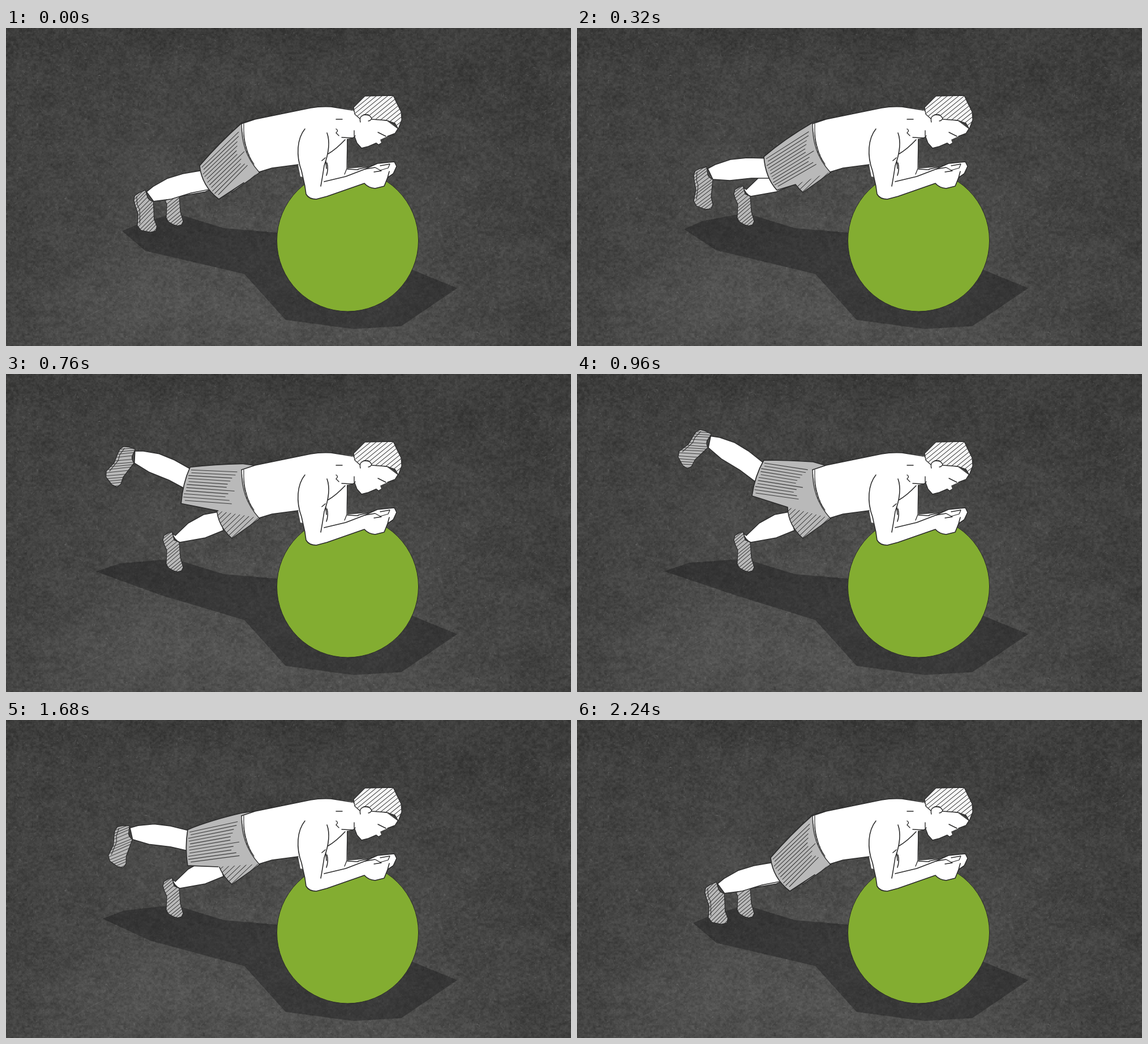
These frames come from a looping animation (998 px wide and 561 px high, 3000 ms). An HTML page with a canvas:

```html
<!DOCTYPE html>
<html lang="en">
<head>
<meta charset="utf-8">
<title>Leg raise on a ball</title>
<style>
html, body { margin: 0; width: 100%; height: 100%; overflow: hidden; background: #444; }
canvas { display: block; width: 100vw; height: 100vh; }
</style>
</head>
<body>
<canvas id="stage" width="998" height="561"></canvas>
<script>
const W = 998, H = 561, LOOP = 3000, STEP = 40, SWING = 960;
const INK = '#2b2b2b', CLOTH = '#b9b9b9', SKIN = '#fff';
const ctx = document.getElementById('stage').getContext('2d');

// ---- floor texture ----
let seed = 7;
const rand = () => {
  seed = (seed * 1664525 + 1013904223) >>> 0;
  return seed / 4294967296;
};

function hash(x, y) {
  let h = Math.imul(x, 374761393) + Math.imul(y, 668265263);
  h = Math.imul(h ^ (h >>> 13), 1274126177);
  return ((h ^ (h >>> 16)) >>> 0) / 4294967296;
}

function noise(x, y) {
  const i = Math.floor(x), j = Math.floor(y);
  const s = v => v * v * (3 - 2 * v), u = s(x - i), v = s(y - j);
  const top = hash(i, j) * (1 - u) + hash(i + 1, j) * u;
  const low = hash(i, j + 1) * (1 - u) + hash(i + 1, j + 1) * u;
  return top * (1 - v) + low * v - 0.5;
}

function makeFloor() {
  const c = document.createElement('canvas');
  c.width = W; c.height = H;
  const g = c.getContext('2d'), img = g.createImageData(W, H);
  for (let y = 0, k = 0; y < H; y++) {
    for (let x = 0; x < W; x++, k += 4) {
      const d = Math.hypot((x - 440) / 480, (y - 455) / 300);
      let v = 61 + 24 * Math.exp(-d * d * 1.3);
      v += noise(x / 130, y / 80) * 8 + noise(x / 34 + 90, y / 30) * 7;
      v += noise(x / 5, y / 4 + 50) * 15 + noise(x / 2.2, y / 2.2 + 300) * 12;
      v = Math.round(v / 5) * 5;
      img.data[k] = img.data[k + 1] = v;
      img.data[k + 2] = v - 1;
      img.data[k + 3] = 255;
    }
  }
  g.putImageData(img, 0, 0);
  for (let i = 0; i < 2600; i++) {
    const x = rand() * W, y = rand() * H, a = rand() * 6.28, r = 1 + rand() * 4;
    g.strokeStyle = rand() < 0.6 ? 'rgba(170,170,170,.2)' : 'rgba(20,20,20,.22)';
    g.lineWidth = 0.6 + rand() * 0.8;
    g.beginPath();
    g.moveTo(x, y);
    g.lineTo(x + Math.cos(a) * r, y + Math.sin(a) * r);
    g.stroke();
  }
  g.strokeStyle = 'rgba(140,140,140,.16)';
  g.stroke(new Path2D('M110 527L245 455M150 505L225 471M205 376L275 381M840 335L868 300M380 310V350'));
  return c;
}
const floor = makeFloor();

// ---- drawing helpers ----
function shape(path, fill, line = 1.5) {
  if (fill) { ctx.fillStyle = fill; ctx.fill(path); }
  if (line) { ctx.strokeStyle = INK; ctx.lineWidth = line; ctx.stroke(path); }
}

function hatch(path, x, y, angle, gap, size) {
  ctx.save();
  ctx.clip(path);
  ctx.translate(x, y);
  ctx.rotate(angle);
  ctx.beginPath();
  for (let v = -size; v <= size; v += gap) {
    ctx.moveTo(-size, v);
    ctx.lineTo(size, v + 1.5 * Math.sin(v));
  }
  ctx.strokeStyle = '#3c3c3c';
  ctx.lineWidth = 1;
  ctx.stroke();
  ctx.restore();
}

const mix = (a, b, u) => [a[0] + (b[0] - a[0]) * u, a[1] + (b[1] - a[1]) * u];
const P = p => p[0].toFixed(2) + ' ' + p[1].toFixed(2);

// Four poses, from foot down to foot up, joined by a cubic.
const POSE = [0, 0.25, 0.691, 1];
function weights(e) {
  return POSE.map((a, i) =>
    POSE.reduce((w, b, j) => i === j ? w : w * (e - b) / (a - b), 1));
}
const blend = (keys, w) => keys.reduce((s, k, i) => s + k * w[i], 0);
const spot = (xs, ys) => w => [blend(xs, w), blend(ys, w)];

// ---- still parts ----
const farSock = new Path2D('M277 293L279 285 288 280 294 279 297 293 306 297 308 324 313 341 310 347 303 349 296 347 287 342 283 335 284 311 280 302Z');
const farLeg = new Path2D('M294 281Q297 293 307 297L352 289 384 276 376 243 349 248 322 263 299 285Z');
const farShorts = new Path2D('M372 235Q373 267 399 290L448 255 420 200Z');
const torso = new Path2D('M416 169L440 161 538 141Q555 138 574 139L612 144 618 152 640 150 650 180 617 192 602 196 603 250 560 272 520 262 516 241 470 247 447 254Q423 223 416 169Z');
const back = new Path2D('M416 169L440 161 538 141Q555 138 574 139L612 145M447 254L470 247 516 241');
const waist = new Path2D('M416 169C416 200 423 228 447 254M420 169C419 199 426 224 438 240');
const farArm = new Path2D('M601 195L603 248 640 245 645 254 562 274 558 240 569 222Z');
const arm = new Path2D('M528 178C514 195 512 225 522 252L528 279 530 293Q535 302 548 302L567 297 633 274Q640 282 652 283L668 279 674 264 684 257 690 244 686 236 656 239 634 249 600 262 562 271 557 258 565 235Q573 207 567 185Z');
const armLines = new Path2D('M528 178C514 195 512 225 522 252L528 279 530 293Q535 302 548 302L567 297 633 274Q640 282 652 283L668 279 674 264 677 253M674 264L684 257 690 244 686 236 656 239 634 249 600 262 562 271M556 279Q559 263 562 243Q575 207 567 185M558 234L564 229M569 222Q583 214 599 197M565 235L566 248M567 238Q570 249 566 260');
const handLines = new Path2D('M634 249L652 246 661 251 675 247 678 240 661 243M650 254L663 252M603 196L602 248 598 258M603 249L622 250M622 249L640 245');
const face = new Path2D('M615 152L646 160 673 164 692 178 687 186 674 191 661 197 663 203 658 206 654 203 640 209 628 212 620 203 615 190Z');
const faceLines = new Path2D('M692 178L687 186 674 191M663 203L658 206 654 203 640 209 628 212 620 203 615 190 615 181M657 184L671 191M593 193L613 194 617 190M583 161H594M583 178Q588 181 583 185L588 190');
const hair = new Path2D('M614 140L634 120 684 119 690 132 698 148 699 162 693 178 687 168 673 163 646 161 640 153 632 153 625 160 616 152Z');
const ear = new Path2D('M626 166Q623 155 634 153Q644 153 646 160Q643 164 640 164');
const ball = new Path2D();
ball.arc(603.5, 375, 125, 0, Math.PI * 2);

// ---- moving parts; shin and sock turn about the ankle ----
const ANKLE = [235, 257];
const ankleAt = spot([254, 235, 221, 234], [297, 257, 189, 119]);
const shinTurn = [-11, 0, 15.5, 37], sockTurn = [-8, 0, 18, 41];
const shin = new Path2D('M231 248L244 241 271 232 300 229 345 230 345 265 308 265 270 269 240 267Z');
const sock = new Path2D('M206 259L209 252 217 248 229 245 231 259Q233 264 240 267L237 298 240 311 237 319 227 320 211 314 206 305 210 285 207 269Z');
const sockFold = new Path2D('M212 254L211 268 214 278 211 302');

const hemTop = spot([342, 330, 321, 330], [243, 227, 187, 152]);
const hemMid = spot([346, 333, 314, 314], [279, 264, 218, 180]);
const hemLow = spot([376, 353, 317, 309], [302, 286, 251, 215]);
const topMid = spot([376, 366, 362, 372], [203, 196, 173, 152]);
const seat = spot([417, 416, 417, 417], [167, 167, 163, 155]);
const crotch = spot([420, 386, 375, 372], [273, 276, 255, 235]);
const hatchEnd = spot([428, 424, 410, 390], [248, 246, 244, 226]);
const shadowTip = spot([205, 189, 168, 154], [358, 355, 350, 348]);
const shadowTop = spot([232, 220, 206, 198], [347, 341, 336, 333]);
const shadowLow = spot([246, 246, 258, 285], [393, 392, 389, 392]);

function turned(w, degrees, draw) {
  const a = ankleAt(w);
  ctx.save();
  ctx.translate(a[0], a[1]);
  ctx.rotate(blend(degrees, w) * Math.PI / 180);
  ctx.translate(-ANKLE[0], -ANKLE[1]);
  draw();
  ctx.restore();
}

function drawShadow(w) {
  ctx.fillStyle = 'rgba(20,20,20,.4)';
  ctx.fill(new Path2D(`M${P(shadowTip(w))}L${P(shadowTop(w))} 298 326 332 337 385 353 478 361 600 390 724 429 797 459 698 526 615 531 494 515 421 434L${P(shadowLow(w))}Z`));
}

function drawShorts(w) {
  const a = hemTop(w), m = hemMid(w), b = hemLow(w), s = seat(w), c = crotch(w);
  const edge = `M438 161L${P(s)}Q${P(topMid(w))} ${P(a)}Q${P(m)} ${P(b)}L${P(c)}`;
  const body = new Path2D(edge + 'L447 254 424 220 416 169Z');
  shape(body, CLOTH, 0);
  shape(new Path2D(edge), null, 1.7);

  ctx.save();
  ctx.clip(body);
  ctx.beginPath();
  const end = hatchEnd(w), start = [s[0] - 6, s[1] + 9];
  for (let i = 1; i < 12; i++) {
    const u = i / 12;
    const q = mix(mix(a, m, u), mix(m, b, u), u), r = mix(start, end, u);
    const from = mix(q, r, 0.03 + 0.05 * hash(i, 3));
    const to = mix(q, r, 0.78 + 0.22 * hash(i, 8));
    ctx.moveTo(from[0], from[1]);
    ctx.lineTo(to[0], to[1]);
  }
  ctx.strokeStyle = '#3c3c3c';
  ctx.lineWidth = 1.1;
  ctx.stroke();
  ctx.restore();
}

function drawLegs(w) {
  shape(farSock, CLOTH, 1.2);
  hatch(farSock, 295, 314, -0.7, 5, 50);
  shape(farLeg, SKIN);
  shape(farShorts, CLOTH);
  hatch(farShorts, 406, 258, -0.75, 6.5, 60);
  turned(w, shinTurn, () => shape(shin, SKIN));
  turned(w, sockTurn, () => {
    shape(sock, CLOTH, 1.3);
    hatch(sock, 222, 284, -0.65, 5, 55);
    shape(sockFold, null, 1);
  });
  drawShorts(w);
}

function drawBody() {
  shape(ball, '#83ad31', 1);
  shape(torso, SKIN, 0);
  shape(farArm, SKIN, 0);
  shape(arm, SKIN, 0);
  shape(face, SKIN, 0);
  shape(back);
  shape(waist, null, 1.2);
  shape(armLines, null, 1.6);
  shape(handLines, null, 1.3);
  shape(faceLines, null, 1.4);
  shape(hair, '#f7f7f7', 1.3);
  hatch(hair, 658, 145, -0.68, 6.2, 65);
  shape(ear, SKIN, 1.4);
}

const ease = u => 0.5 - 0.5 * Math.cos(Math.PI * Math.min(1, Math.max(0, u)));

function lift(t) {
  if (t < 1360) return ease(t / SWING);
  return 1 - ease((t - 1280) / SWING);
}

function draw(t) {
  const w = weights(lift(t));
  ctx.drawImage(floor, 0, 0);
  drawShadow(w);
  drawLegs(w);
  drawBody();
}

ctx.lineJoin = ctx.lineCap = 'round';
const begin = performance.now();
function tick() {
  const t = (performance.now() - begin) % LOOP;
  draw(Math.floor(t / STEP) * STEP);
  requestAnimationFrame(tick);
}
tick();
</script>
</body>
</html>
```
